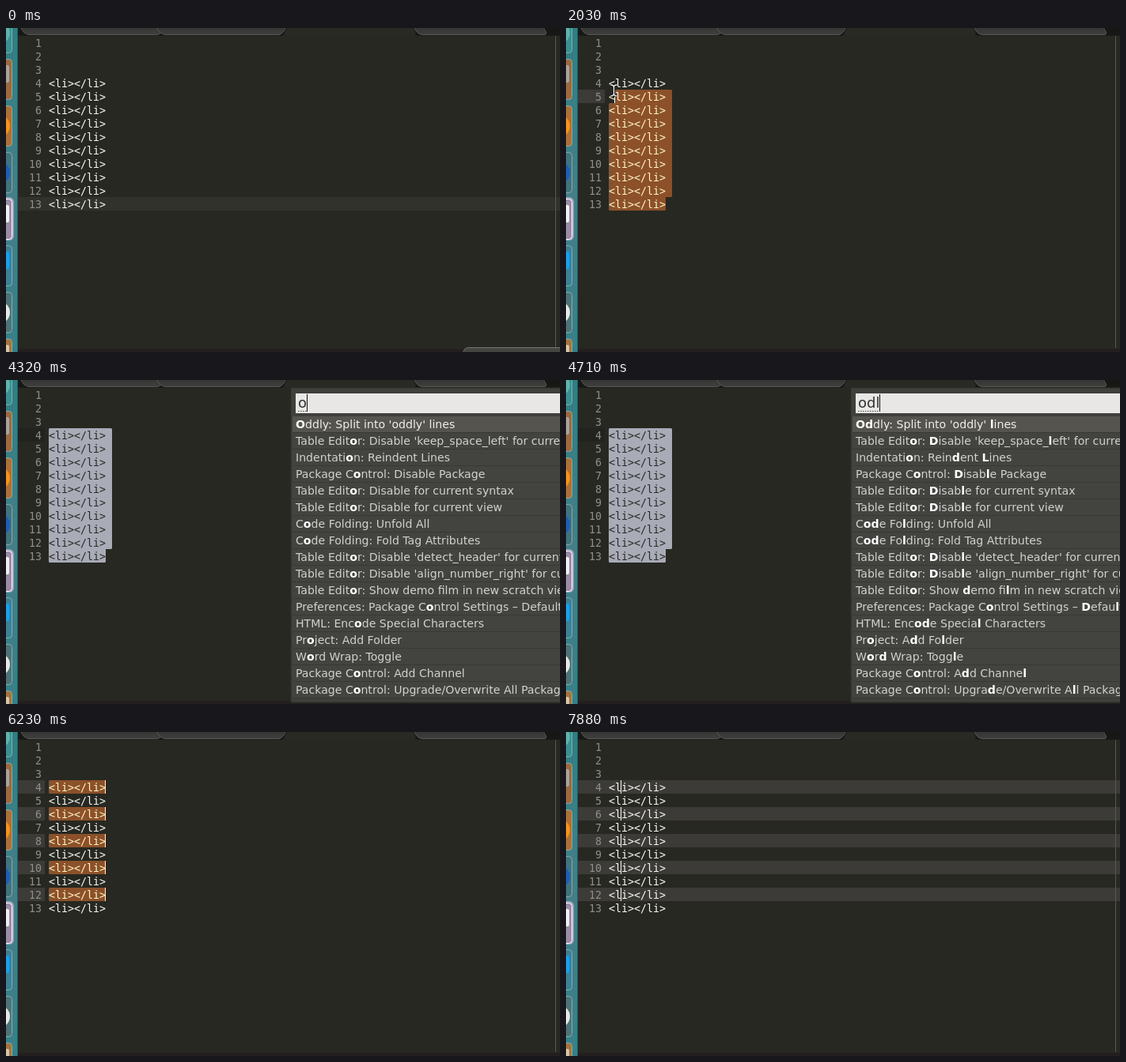
Write an HTML page that moves like this. It is 700 px wide and 410 px high and loops after 8 s.

```html
<!DOCTYPE html>
<html lang="en">
<head>
<meta charset="utf-8">
<title>Split selection</title>
<style>
  html, body { margin: 0; width: 100%; height: 100%; overflow: hidden; background: #272822; }
  svg { display: block; width: 700px; height: 410px; }
  text { white-space: pre; }
  #code text { font: 13.29px "DejaVu Sans Mono", monospace; }
  #code .num { fill: #8f908a; text-anchor: end; }
  #palette text { font: 14.1px "DejaVu Sans", sans-serif; fill: #d2d2cd; }
  #palette .hit { font-weight: bold; fill: #fff; }
  #palette #query { font-size: 18px; fill: #333; }
  #sel { stroke-width: 3; stroke-linejoin: round; }
</style>
</head>
<body>
<svg id="stage" viewBox="0 0 700 410">
  <defs>
    <linearGradient id="teal" x2="0" y2="1">
      <stop offset="0" stop-color="#2f7f82"/><stop offset=".5" stop-color="#457f88"/><stop offset="1" stop-color="#37808a"/>
    </linearGradient>
    <linearGradient id="tab" x2="0" y2="1">
      <stop offset="0" stop-color="#343432"/><stop offset="1" stop-color="#3e3e3c"/>
    </linearGradient>
  </defs>

  <rect width="700" height="410" fill="#272822"/>
  <g id="rows"></g>
  <path id="sel"/>
  <g id="code"></g>
  <g id="carets" fill="#f8f8f0"></g>

  <g id="frame">
    <path d="M694.5 10V405" stroke="#585854"/>
    <rect x="15" y="406" width="685" height="4" fill="#231f1f"/>
    <g id="status">
      <path d="M577 410Q579 404.500 585 404.500H700V410Z" fill="#444441"/>
      <path d="M578 409Q580 404.500 585 404.500H700" fill="none" stroke="#777774"/>
    </g>
    <rect x="15" width="685" height="9" fill="#171815"/>
    <path d="M353 9.500Q349 9 355 0H514Q520 9 516 9.500Z" fill="#292a24"/>
    <g fill="url(#tab)" stroke="#575754">
      <path d="M18 -2Q22 8.500 30 8.500H190Q199 8.500 192 -2Z"/>
      <path d="M190 -2Q194 8.500 202 8.500H344Q350 8.500 354 -2Z"/>
      <path d="M515 -2Q519 8.500 527 8.500H680Q686 8.500 678 -2Z"/>
    </g>
    <path d="M15 9.500H349M519 9.500H700" stroke="#1b1c18"/>
  </g>

  <g id="dock">
    <rect width="15" height="410" fill="url(#teal)"/>
    <path d="M14.500 0V410" stroke="#2f5f63"/>
  </g>

  <g id="palette">
    <rect id="panel" x="360" y="10" width="345" fill="#3f3f3c" stroke="#30302d"/>
    <rect x="366" y="17" width="340" height="25" fill="#e9e7e5"/>
    <text id="query" x="369" y="35"></text>
    <path id="wave" stroke="#444" stroke-dasharray="1.500 1.500"/>
    <path id="inputCaret" stroke="#111"/>
    <g id="list"></g>
  </g>

  <g id="mouse" fill="none">
    <path d="M-4 -7Q0 -7 0 -4Q0 -7 4 -7M0 -4V5M-4 7Q0 7 0 4Q0 7 4 7" stroke="#111" stroke-width="3"/>
    <path d="M-4 -7Q0 -7 0 -4Q0 -7 4 -7M0 -4V5M-4 7Q0 7 0 4Q0 7 4 7" stroke="#fff" stroke-width="1.300"/>
  </g>
</svg>

<script>
const LOOP = 8000, LAST = 13, FIRST = 4, ROW = 17, CHAR = 8;
const $ = id => document.getElementById(id);
const add = (parent, tag, attrs, text) => {
  const el = document.createElementNS('http://www.w3.org/2000/svg', tag);
  for (const k in attrs) el.setAttribute(k, attrs[k]);
  if (text) el.textContent = text;
  return parent.appendChild(el);
};
const set = (el, attrs) => { for (const k in attrs) el.setAttribute(k, attrs[k]); };
const show = (el, on) => el.setAttribute('visibility', on ? 'visible' : 'hidden');
const ramp = (t, a, b) => Math.min(1, Math.max(0, (t - a) / (b - a)));
const rowY = n => 10 + ROW * (n - 1);
const colX = c => 54 + CHAR * c;

// Launcher tiles: background, shape colour, shape
const tiles = [
  ['#3b8f90', '#5fb5ae', 'circle'], ['#9a6a40', '#a9a299', 'square'],
  ['#a8713c', '#f0941f', 'circle'], ['#41727e', '#1c5fae', 'circle'],
  ['#9a8ba6', '#f1eff6', 'square'], ['#3f7f95', '#1f9fe8', 'square'],
  ['#4c7478', '#e4e8e8', 'circle'], ['#a3753f', '#d9c6a4', 'square']
];
tiles.forEach(([bg, ink, shape], i) => {
  const y = -20 + 59 * i, dock = $('dock'), active = i === 4;
  if (active) add(dock, 'rect', { x: -20, y: y - 2, width: 30, height: 55, rx: 6, fill: '#c9b8d6', opacity: .7 });
  add(dock, 'rect', { x: -20, y: y + .5, width: 27.5, height: 51, rx: 4, fill: bg, stroke: active ? '#fff' : '#83aeb0' });
  if (shape === 'circle') add(dock, 'circle', { cx: -9, cy: y + 26, r: 14, fill: ink });
  else add(dock, 'rect', { x: -20, y: y + 8, width: 24, height: 22, rx: 2, fill: ink });
});

// Editor rows
const lines = [];
for (let n = 1; n <= LAST; n++) {
  const y = rowY(n), base = y + 14;
  add($('code'), 'text', { x: 45, y: base, class: 'num' }, String(n));
  lines[n] = {
    band: add($('rows'), 'rect', { x: 15, y, height: ROW }),
    text: n < FIRST ? null : add($('code'), 'text', { x: 54, y: base }, '<li></li>'),
    caret: add($('carets'), 'rect', { y, width: 1, height: ROW })
  };
}

// Each scene: start, caret lines, caret column, selection kind
const evens = [4, 6, 8, 10, 12], odds = [3, 5, 7, 9, 11];
const scenes = [[0, [13], 9, '']];
const drag = [[13, 9], [12, 9], [11, 9], [9, 9], [8, 8], [7, 5], [6, 2], [5, 1], [4, 0]];
drag.forEach(([n, c], i) => scenes.push([i < 8 ? 1620 + 58 * i : 2080, [n], c, i ? 'drag' : '']));
scenes.push(
  [6230, evens, 9, 'each'], [6550, evens, 9, ''],
  [7100, odds, 9, ''], [7310, evens, 0, ''],
  [7690, evens, 1, ''], [7880, evens, 2, '']
);

function caretAlpha(t) {
  if (t < 1620) return 0;
  if (t < 3480) return 1 - ramp(t, 2680, 2950);
  if (t < 3880) return ramp(t, 3480, 3690);
  if (t < 6230) return 0;
  if (t < 7100) return 1 - ramp(t, 6600, 6930);
  return 1;
}

const box = (x, y, r) => `M${x + 1.5} ${y + 1.5}H${r - 1.5}V${y + ROW - 1.5}H${x + 1.5}Z`;
function selectionPath(kind, at, col) {
  if (kind === 'each') return at.map(n => box(54, rowY(n), 126)).join('');
  if (kind !== 'drag') return '';
  const n = at[0], x = colX(col), y = rowY(n), end = rowY(LAST);
  return `M${x + 1.5} ${y + 1.5}H132.5V${end - 1.5}H124.5V${end + ROW - 1.5}H55.5V${y + ROW + 1.5}H${x + 1.5}Z`;
}

function drawEditor(t) {
  const [, at, col, kind] = scenes.findLast(s => s[0] <= t);
  const blurred = t >= 3880 && t < 6230;
  const paint = blurred ? '#a9abb7' : '#8c5129';
  set($('sel'), { d: selectionPath(kind, at, col), fill: paint, stroke: paint });
  const alpha = caretAlpha(t);
  lines.forEach((line, n) => {
    const here = at.includes(n);
    show(line.band, here);
    set(line.band, { width: kind ? 34 : 685, fill: blurred ? '#22231e' : t < 1620 ? '#32322d' : '#3c3b37' });
    show(line.caret, here && alpha > 0);
    set(line.caret, { x: colX(line.text ? col : 0) - 1, opacity: alpha });
    if (!line.text) return;
    const picked = kind === 'each' ? here : kind === 'drag' && (n > at[0] || here && col < 5);
    set(line.text, { fill: !picked ? '#f8f8f2' : blurred ? '#2a2b28' : '#fff3c4' });
  });
}

// An asterisk marks a letter matched by the query
const commands = [
  "*O*ddly: Split into 'oddly' *lines",
  "Table Edit*or: *Disable 'keep_space_*left' for current view",
  "Indentati*on: Rein*dent *Lines",
  "Package C*ontrol: *Disab*le Package",
  "Table Edit*or: *Disab*le for current syntax",
  "Table Edit*or: *Disab*le for current view",
  "C*o*de Fo*lding: Unfold All",
  "C*o*de Fo*lding: Fold Tag Attributes",
  "Table Edit*or: *Disab*le 'detect_header' for current view",
  "Table Edit*or: *Disab*le 'align_number_right' for current view",
  "Table Edit*or: Show *demo fi*lm in new scratch view",
  "Preferences: Package C*ontrol Settings – *Defau*lt",
  "HTML: Enc*o*de Specia*l Characters",
  "Pr*oject: A*dd Fo*lder",
  "W*or*d Wrap: Togg*le",
  "Package C*ontrol: A*dd Channe*l",
  "Package C*ontrol: Upgra*de/Overwrite A*ll Packages"
];
const narrowed = ["*O*dd*l*y: Split into 'oddly' lines", "*O*dd*l*y: Split into 'evenly' lines"];
const typing = [[3880, ''], [4220, 'o'], [4550, 'od'], [4710, 'odl'], [4980, 'odly']];

let shown = null;
function fillPalette(query) {
  if (query === shown) return;
  shown = query;
  const items = query.length > 3 ? narrowed : commands;
  const list = $('list');
  list.replaceChildren();
  items.forEach((item, i) => {
    const y = 46 + 21 * i;
    add(list, 'rect', { x: 362, y, width: 340, height: 21, fill: i ? '#434340' : '#55544e' });
    add(list, 'path', { d: `M362 ${y + 20.5}H700`, stroke: '#383835' });
    const label = add(list, 'text', { x: 366, y: y + 15 });
    if (!i) label.style.fill = '#f0f0ec';
    let hits = 0;
    label.innerHTML = item.replace(/\*(.)/g, (_, c) =>
      hits++ < query.length ? `<tspan class="hit">${c}</tspan>` : c);
  });
  set($('panel'), { height: 41 + 21 * items.length });
  $('query').textContent = query;
  const end = 369 + (query ? $('query').getComputedTextLength() : 0);
  set($('wave'), { d: query ? `M369 39.500H${end}` : '' });
  set($('inputCaret'), { d: `M${Math.round(end) + .5} 18V40` });
}

function drawPalette(t) {
  const open = t >= 3880 && t < 5470;
  $('palette').style.display = open ? '' : 'none';
  if (!open) return;
  fillPalette(typing.findLast(s => s[0] <= t)[1]);
  set($('palette'), { opacity: 1 - ramp(t, 5320, 5470) });
}

// Pointer moves: start, end, from, to
const moves = [
  [670, 1400, [272, 380], [192, 231]],
  [1620, 2060, [192, 231], [58, 77]],
  [2370, 2440, [58, 77], [54, 69]],
  [2620, 3030, [54, 69], [333, 378]]
];
function drawMouse(t) {
  const on = t >= 670 && t < 3030;
  show($('mouse'), on);
  if (!on) return;
  const [a, b, p, q] = moves.findLast(m => m[0] <= t);
  const u = ramp(t, a, b), e = u * u * (3 - 2 * u);
  const [x, y] = p.map((v, i) => Math.round(v + (q[i] - v) * e));
  set($('mouse'), { transform: `translate(${x + .5} ${y})` });
}

const start = performance.now();
function tick() {
  const t = (performance.now() - start) % LOOP;
  drawEditor(t);
  drawPalette(t);
  drawMouse(t);
  show($('status'), t < 1620);
  requestAnimationFrame(tick);
}
tick();
</script>
</body>
</html>
```
